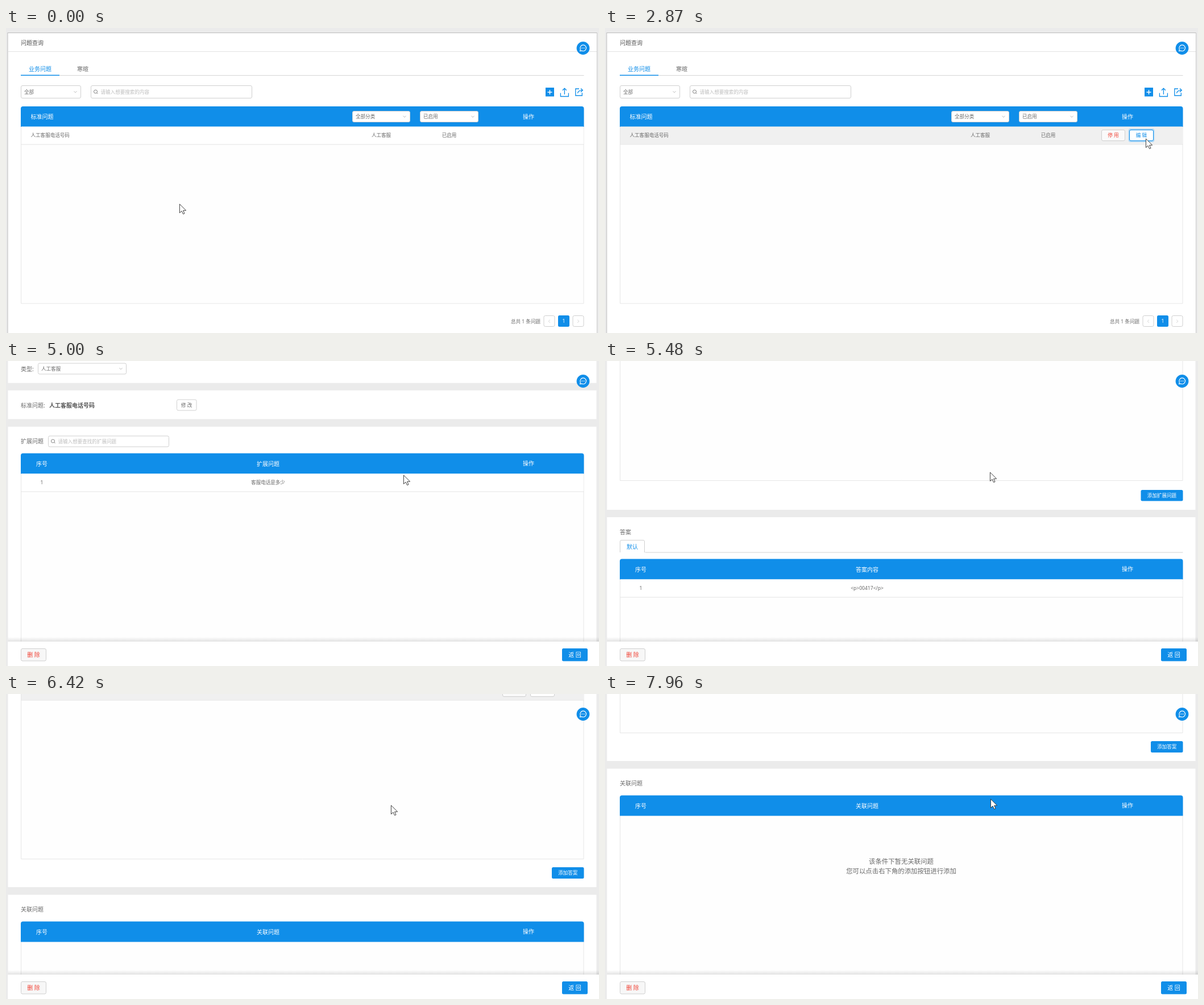
An HTML page with a canvas for the animation above (8000 ms loop, 1043 by 537 pixels).

```html
<!DOCTYPE html>
<html lang="zh-CN">
<head>
<meta charset="utf-8">
<title>问题查询</title>
<style>
html, body { margin: 0; width: 100%; height: 100%; overflow: hidden; background: #ebebeb; }
canvas { display: block; }
</style>
</head>
<body>
<canvas id="stage" width="1043" height="537"></canvas>
<script>
const ctx = document.getElementById('stage').getContext('2d');
const LOOP = 8000, PAGE_SWAP = 2940, CLICK = 2530;
const BLUE = '#108ee9', RED = '#f04134', GREY = '#ebebeb', LINE = '#e6e6e6', EDGE = '#d0d0d0';
const TEXT = '#6a6a6a', DARK = '#555', HINT = '#bdbdbd';
const SMALL = 8.55, BASE = 10, LARGE = 11.4;
const FAMILY = '"Noto Sans", "Noto Sans CJK SC", "Noto Sans CJK", sans-serif';
const LEFT = 26, RIGHT = 1016.5, HEAD = 36, ROW = 31;

// Smooth 0..1 progress between two times.
function ease(t, from, to) {
  const p = Math.min(1, Math.max(0, (t - from) / (to - from)));
  return p * p * (3 - 2 * p);
}

// Every wheel notch scrolls the page by the same amount.
const NOTCH = 106, NOTCH_MS = 220;
const notches = [4942, 5210, 5255, 5530, 5950, 6100, 6260, 6660, 7781];
const scrollAt = t =>
  Math.round(NOTCH * notches.reduce((sum, start) => sum + ease(t, start, start + NOTCH_MS), 0));

const moves = [
  { from: 60, to: 890, x: 104, y: 163 },
  { from: 1150, to: 2200, x: 951, y: 195, sag: 30 },
  { from: 2900, to: 3420, x: 241, y: 89 },
  { from: 3610, to: 4170, x: 656, y: 180 },
  { from: 4300, to: 4900, x: 699, y: 201 },
  { from: 5000, to: 5400, x: 677, y: 196 },
  { from: 6620, to: 7100, x: 677, y: 190 },
  { from: 7820, to: 7890, x: 678, y: 185 }
];

function cursorAt(t) {
  let x = 305, y = 310;
  for (const m of moves) {
    const p = ease(t, m.from, m.to);
    x += (m.x - x) * p;
    y += (m.y - y) * p + (m.sag || 0) * Math.sin(Math.PI * p);
  }
  return { x: Math.round(x), y: Math.round(y) };
}

function rect(x, y, w, h, color) {
  ctx.fillStyle = color;
  ctx.fillRect(x, y, w, h);
}

function box(x, y, w, h, fill, edge, radius = 2.5) {
  const inset = edge ? 0.5 : 0;
  ctx.beginPath();
  ctx.roundRect(x + inset, y + inset, w - 2 * inset, h - 2 * inset, radius);
  ctx.fillStyle = fill;
  ctx.fill();
  if (edge) outline(edge);
}

function outline(color, width = 1) {
  ctx.lineWidth = width;
  ctx.strokeStyle = color;
  ctx.stroke();
}

function disc(x, y, r) {
  ctx.beginPath();
  ctx.arc(x, y, r, 0, 2 * Math.PI);
}

// y is the vertical middle of the glyphs.
function text(str, x, y, color = TEXT, size = SMALL, align = 'left', weight = 400) {
  ctx.font = `${weight} ${size}px ${FAMILY}`;
  ctx.textAlign = align;
  ctx.fillStyle = color;
  ctx.fillText(str, x, y + size * 0.38);
}

const centered = (str, x, y, color, size) => text(str, x, y, color, size, 'center');

function svgStroke(d, x, y, color, width) {
  ctx.save();
  ctx.translate(x, y);
  ctx.lineWidth = width;
  ctx.strokeStyle = color;
  ctx.stroke(new Path2D(d));
  ctx.restore();
}

function chevron(x, y, turns, color = '#b5b5b5') {
  ctx.save();
  ctx.translate(x, y);
  ctx.rotate(turns * 2 * Math.PI);
  svgStroke('M-2.5-1.3 0 1.3 2.5-1.3', 0, 0, color, 0.9);
  ctx.restore();
}

function button(label, x, y, w, h, fill, edge, color, size = SMALL) {
  box(x, y, w, h, fill, edge);
  centered(label, x + w / 2, y + h / 2, color, size);
}

const primary = (label, x, y, w, h, size) => button(label, x, y, w, h, BLUE, null, '#fff', size);

function select(label, x, y, w, h = 20) {
  box(x, y, w, h, '#fff', EDGE);
  text(label, x + 6, y + h / 2);
  chevron(x + w - 10, y + h / 2, 0);
}

function searchField(hint, x, y, w, h) {
  const cx = x + 8.5, cy = y + h / 2;
  box(x, y, w, h, '#fff', EDGE);
  disc(cx, cy - 0.5, 3);
  outline('#777', 0.9);
  svgStroke('M2.1 1.6 4 3.5', cx, cy, '#777', 0.9);
  text(hint, x + 17.5, cy, HINT);
}

function tableFrame(y) {
  box(LEFT, y + 4, RIGHT - LEFT, 343.5, '#fefefe', LINE, 0);
  box(LEFT, y, RIGHT - LEFT, HEAD, BLUE, null, [4, 4, 0, 0]);
  centered('操作', 919, y + HEAD / 2, '#fff', BASE);
}

function rowBand(y, hovered) {
  rect(LEFT + 1, y, RIGHT - LEFT - 2, ROW, hovered ? '#f0f0f0' : '#fff');
  rect(LEFT, y + ROW, RIGHT - LEFT, 1, LINE);
}

function rowActions(y, first, hot, focused) {
  button(first, 873, y + 6, 42, 20, '#fafafa', EDGE, RED);
  if (focused) box(920.5, y + 4, 46, 24, '#b4dbf7', null, 4);
  button('编 辑', 922, y + 6, 43, 20, '#fff', hot ? BLUE : EDGE, hot ? BLUE : TEXT);
}

function toolIcons() {
  rect(949, 105, 15, 15.5, BLUE);
  svgStroke('M-4 0H4M0-4V4', 956.5, 113, '#fff', 1.4);
  svgStroke('M-7 1.5v6H7v-6M0 4V-6.5M-3.5-3.2 0-6.8 3.5-3.2', 982.4, 113, BLUE, 1.3);
  svgStroke('M0-6h-6.2V6H5.3V1M-2.5 2Q-2-3.2 6-3.4M3-6.5 6.3-3.4 3-.3', 1008, 113, BLUE, 1.3);
}

function chatBadge() {
  disc(1015, 35.5, 11.4);
  ctx.fillStyle = BLUE;
  ctx.fill();
  svgStroke('M-5.3 5.3-4.7 2A5.3 5.3 0 1 1-2.2 4.7Z', 1015, 35.2, '#fff', 1.1);
  for (const dx of [-2.4, 0, 2.4]) rect(1014.5 + dx, 34.7, 1.2, 1.2, '#fff');
}

function listPage(t, cursor) {
  rect(3, 8, 1037, 529, '#fff');
  rect(3, 8, 1037, 1, '#bcbcbc');
  rect(2.5, 8, 1, 529, '#bcbcbc');
  rect(1039, 8, 1, 529, '#c8c8c8');
  text('问题查询', LEFT, 26, DARK, BASE);
  rect(4, 41, 1035, 1, '#e2e2e2');

  centered('业务问题', 60, 72, BLUE, BASE);
  centered('寒暄', 135, 72, TEXT, BASE);
  rect(LEFT, 83, RIGHT - LEFT, 1, '#d6d6d6');
  rect(LEFT, 82.5, 68, 1.5, BLUE);

  select('全部', LEFT, 101, 106, 23);
  searchField('请输入想要搜索的内容', 149, 101, 284, 23);
  toolIcons();

  tableFrame(138);
  text('标准问题', 43.5, 156, '#fff', BASE);
  select('全部分类', 609, 146, 102);
  select('已启用', 728, 146, 103);

  const top = 173.5;
  const hovered = cursor.y >= top && cursor.y < top + ROW;
  rowBand(top, hovered);
  text('人工客服电话号码', 43.5, 189);
  centered('人工客服', 660, 189);
  centered('已启用', 779.5, 189);
  if (hovered) rowActions(173, '停 用', cursor.x > 922 && cursor.x < 965, t >= CLICK);

  text('总共 1 条问题', 940, 517, TEXT, SMALL, 'right');
  box(945.5, 506, 20, 20, '#fff', EDGE);
  primary('1', 971, 506, 20, 20);
  box(996.5, 506, 20, 20, '#fff', EDGE);
  chevron(955.5, 516.3, 0.25, '#ccc');
  chevron(1006.5, 516.3, -0.25, '#ccc');
}

const card = (top, bottom) => rect(3.5, top, 1035, bottom - top, '#fff');

function detailTable(y, heading, content, hovered) {
  tableFrame(y);
  centered('序号', 63, y + 18.3, '#fff', BASE);
  centered(heading, 461, y + 18.3, '#fff', BASE);
  if (!content) return;
  rowBand(y + HEAD, hovered);
  centered('1', 63, y + 51.5);
  centered(content, 461, y + 51.5);
  if (hovered) rowActions(y + HEAD - 0.5, '删 除', false, false);
}

function detailPage(scroll) {
  ctx.save();
  ctx.translate(0, -scroll);
  card(8, 57.7);
  text('类型:', LEFT, 33, TEXT, BASE);
  select('人工客服', 56, 22.5, 156);

  card(70.7, 121.3);
  text('标准问题:', LEFT, 97, TEXT, BASE);
  text('人工客服电话号码', 76, 97, DARK, BASE, 'left', 700);
  button('修 改', 300, 86.5, 35.5, 20, '#fff', EDGE, TEXT);

  card(134.7, 580);
  text('扩展问题', LEFT, 160.5, TEXT, BASE);
  searchField('请输入想要查找的扩展问题', 74, 150.5, 213, 20);
  detailTable(181.5, '扩展问题', '客服电话是多少', false);
  primary('添加扩展问题', 942.5, 545, 74, 19.5);

  card(593, 1063);
  text('答案', LEFT, 619, TEXT, BASE);
  rect(LEFT, 654.5, RIGHT - LEFT, 1, '#d2d2d2');
  box(LEFT, 633, 44, 24, '#fff', EDGE);
  rect(LEFT - 1, 655, 46, 3, '#fff');
  centered('默认', 48, 645, BLUE, BASE);
  detailTable(666.5, '答案内容', '<p>00417</p>', scroll > 500);
  primary('添加答案', 960, 1028, 56.5, 20);

  card(1076.5, 1540);
  text('关联问题', LEFT, 1102.5, TEXT, BASE);
  detailTable(1123.5, '关联问题');
  centered('该条件下暂无关联问题', 521, 1239.5, TEXT, LARGE);
  centered('您可以点击右下角的添加按钮进行添加', 521, 1256.5, TEXT, LARGE);
  ctx.restore();

  const shade = ctx.createLinearGradient(0, 486, 0, 494);
  shade.addColorStop(0, 'rgba(0,0,0,0)');
  shade.addColorStop(1, 'rgba(0,0,0,.11)');
  rect(3.5, 486, 1039.5, 8, shade);
  rect(3.5, 494, 1039.5, 43, '#fff');
  button('删 除', LEFT, 506, 45, 22.5, '#f7f7f7', EDGE, RED, BASE);
  primary('返 回', 978, 506, 45, 22.5, BASE);
}

function pointer({ x, y }) {
  const arrow = new Path2D('M0 0V15.5L3.6 12.2 6.2 17.6 8.6 16.6 6.2 11.4 11.2 11.2Z');
  ctx.save();
  ctx.translate(x + 0.4, y);
  ctx.fillStyle = '#fff';
  ctx.fill(arrow);
  ctx.lineWidth = 0.9;
  ctx.strokeStyle = '#2a2a2a';
  ctx.stroke(arrow);
  ctx.restore();
}

function draw(now) {
  const t = now % LOOP;
  const cursor = cursorAt(t);
  rect(0, 0, 1043, 537, GREY);
  if (t < PAGE_SWAP) listPage(t, cursor);
  else detailPage(scrollAt(t));
  chatBadge();
  pointer(cursor);
  requestAnimationFrame(draw);
}
requestAnimationFrame(draw);
</script>
</body>
</html>
```
